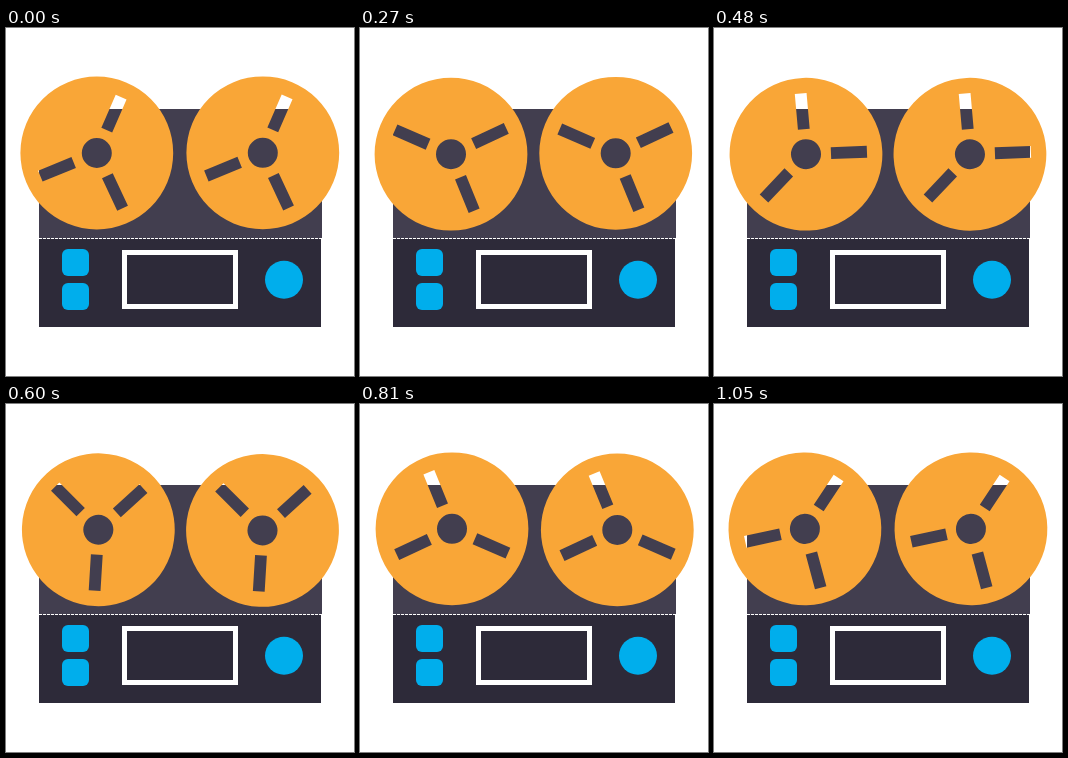
An HTML page with a canvas that plays this animation: 348 px wide and 348 px high, repeating every 1080 ms.

```html
<!DOCTYPE html>
<html lang="en">
<head>
<meta charset="utf-8">
<title>Tape recorder</title>
<style>
  html, body { margin: 0; width: 100%; height: 100%; overflow: hidden; background: #fff; }
  canvas { display: block; width: 348px; height: 348px; }
</style>
</head>
<body>
<canvas id="stage" width="348" height="348"></canvas>
<script>
const ctx = document.getElementById('stage').getContext('2d');
const LOOP = 1080, STEP = 30, STEPS = LOOP / STEP;
const RAD = Math.PI / 180;
const BACK = '#423e4f', PANEL = '#2d2a39', ORANGE = '#f9a637', BLUE = '#00aeec';

// Slot directions, clockwise from up; they are not evenly spaced.
const SLOTS = [23.5, 155, 247.7];
const REELS = [
  { x: 91.5, y: 125.5, dx: -0.7, dy: -0.5 },
  { x: 256.5, y: 125.6, dx: 0.3, dy: -0.8 }
];

function box(x, y, w, h, color, r = 0) {
  ctx.fillStyle = color;
  ctx.beginPath();
  ctx.roundRect(x, y, w, h, r);
  ctx.fill();
}

function disc(x, y, r, color) {
  ctx.fillStyle = color;
  ctx.beginPath();
  ctx.arc(x, y, r, 0, Math.PI * 2);
  ctx.fill();
}

function reelShape() {
  const path = new Path2D();
  path.arc(0, 0, 76.4, 0, Math.PI * 2);
  path.closePath();
  path.moveTo(15, 0);
  path.arc(0, 0, 15, 0, Math.PI * 2);
  path.closePath();
  for (const deg of SLOTS) {
    const slot = new Path2D();
    slot.rect(-5.9, -61, 11.8, 36);
    path.addPath(slot, new DOMMatrix().rotate(deg));
  }
  return path;
}
const reel = reelShape();

// The hub and slots are holes, so the cabinet or the white page shows through.
function drawReel({ x, y, dx, dy }, angle) {
  ctx.save();
  ctx.translate(x, y);
  ctx.rotate(angle);
  ctx.translate(dx, dy);
  ctx.fillStyle = ORANGE;
  ctx.fill(reel, 'evenodd');
  ctx.restore();
}

function drawCabinet() {
  box(33, 81, 283, 130, BACK);
  box(33, 211, 282, 88, PANEL);
  ctx.strokeStyle = '#fff';
  ctx.lineWidth = 1;
  ctx.setLineDash([3, 1]);
  ctx.beginPath();
  ctx.moveTo(33, 210.5);
  ctx.lineTo(316, 210.5);
  ctx.stroke();
  ctx.setLineDash([]);

  box(116, 222, 116, 59, '#fff');
  box(121, 227, 106, 49, PANEL);
  box(56, 221, 27, 27, BLUE, 6);
  box(56, 255, 27, 27, BLUE, 6);
  disc(278, 251.8, 19, BLUE);
}

function draw(now) {
  const step = Math.floor((now % LOOP) / STEP);
  const angle = -step * 360 / STEPS * RAD;
  ctx.fillStyle = '#fff';
  ctx.fillRect(0, 0, 348, 348);
  drawCabinet();
  for (const r of REELS) drawReel(r, angle);
}

const start = performance.now();
function tick() {
  draw(performance.now() - start);
  requestAnimationFrame(tick);
}
tick();
</script>
</body>
</html>
```
